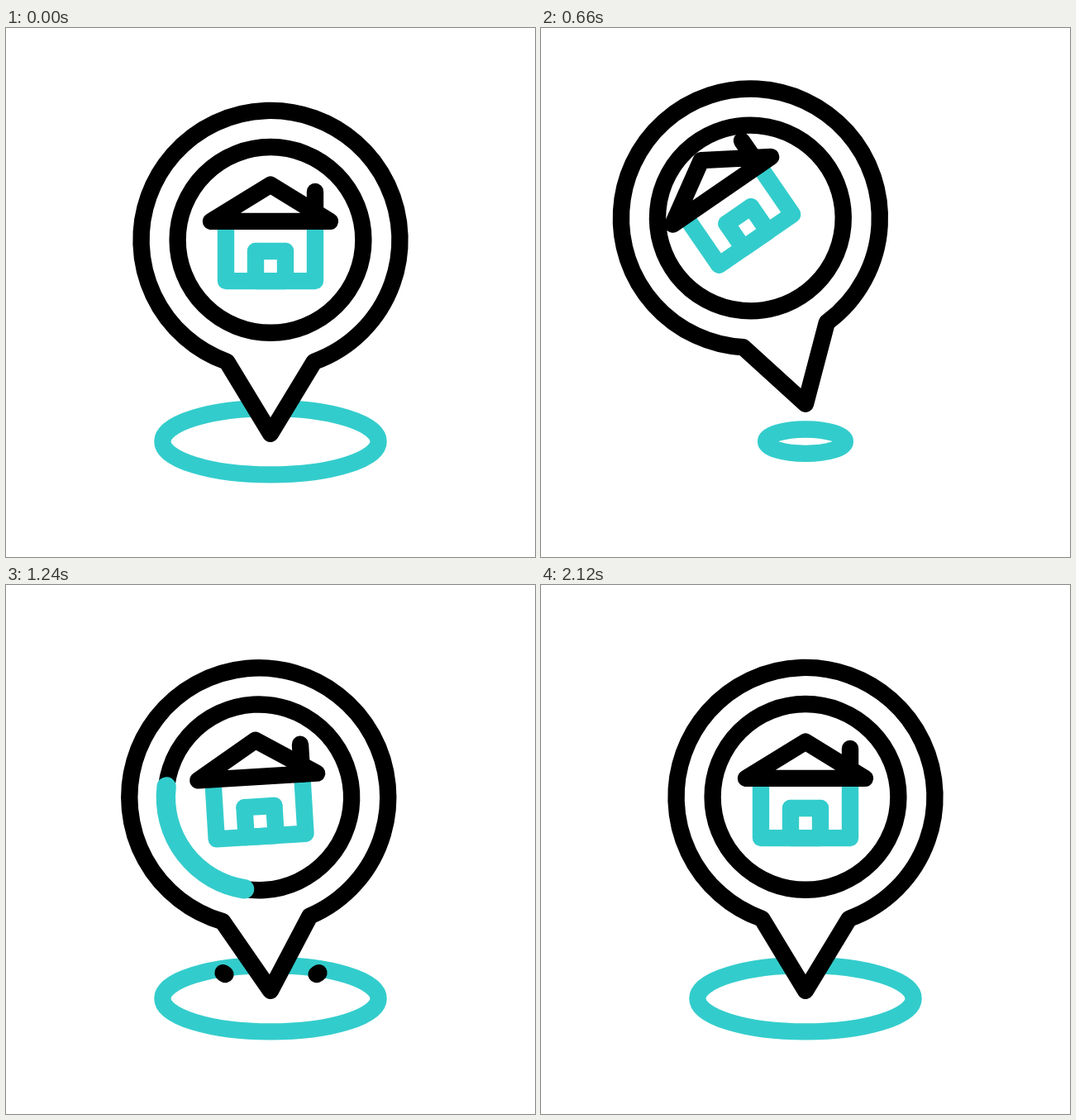
An HTML page with a canvas for the animation above (3.6 s loop, 640x640 px).

```html
<!DOCTYPE html>
<html lang="en">
<head>
<meta charset="utf-8">
<title>Home pin</title>
<style>
  html, body { margin: 0; width: 100%; height: 100%; overflow: hidden; background: #fff; }
  canvas { display: block; width: 100vw; height: 100vh; }
</style>
</head>
<body>
<canvas id="stage" width="640" height="640"></canvas>
<script>
const ctx = document.getElementById('stage').getContext('2d');
const LOOP = 3600;
const BLACK = '#000', CYAN = '#33cccc';
const LINE = 20.4;
const MID = 320, TIP = 490.8;
const OUTER = 156.5, INNER = 112.4;
const HEAD = 234.4;       // from the tip up to the head centre
const HOUSE_PIVOT = 54;   // below the head centre

const WINDUP = 840, SWING = 1067, BEAT = 167;

const rad = deg => deg * Math.PI / 180;
const smooth = x => x * x * (3 - 2 * x);

// Eased 0 to 1 between two times; `power` above 1 delays the rise.
function ramp(t, from, to, power = 1) {
  const x = Math.min(1, Math.max(0, (t - from) / (to - from)));
  return smooth(x ** power);
}

// Rises from a to peak, then falls back until b.
const hump = (t, a, peak, b) => ramp(t, a, peak) - ramp(t, peak, b);

// Leans back, then swings past upright and settles.
const pinTilt = t =>
  -18.7 * hump(t, 0, WINDUP, SWING)
  + 4 * hump(t, WINDUP, SWING, SWING + BEAT)
  - 3.5 * hump(t, SWING, SWING + BEAT, SWING + 2 * BEAT)
  + 0.5 * hump(t, SWING + BEAT, SWING + 2 * BEAT, SWING + 3 * BEAT);

const pinLift = t => 39 * (ramp(t, 0, 720, 2.15) - ramp(t, WINDUP, 1000));

const groundScale = t =>
  1 - 0.68 * (ramp(t, 85, 770) - ramp(t, WINDUP, 1050))
  + 0.136 * hump(t, WINDUP, 1050, 1145);

const houseTilt = t => -18 * (ramp(t, 0, 615) - ramp(t, 900, 1233));

function houseLift(t) {
  const windup = ramp(t, 0, 615) - ramp(t, 890, 1200);
  const left = 1 - Math.min(1, Math.max(0, (t - 1400) / 720));
  const hop = ramp(t, 1200, 1400) * smooth(left ** 2.4);
  return 23 * windup + 21.7 * hop;
}

function stroke(color, width = LINE) {
  ctx.strokeStyle = color;
  ctx.lineWidth = width;
  ctx.stroke();
}

function line(color, ...points) {
  ctx.beginPath();
  points.forEach(([x, y]) => ctx.lineTo(x, y));
  stroke(color);
}

function ring(radius, from, to, color, width) {
  ctx.beginPath();
  ctx.arc(0, 0, radius, rad(from), rad(to));
  stroke(color, width);
}

function drawGround(t) {
  const s = groundScale(t);
  ctx.beginPath();
  ctx.ellipse(MID, 500.2, 130.6 * s, 40.2 * s, 0, 0, 2 * Math.PI);
  stroke(CYAN);
}

function drawSparks(t) {
  if (t <= 930 || t >= 1420) return;
  const near = 20 + 38 * ramp(t, 1000, 1290);
  const far = 20.01 + 38 * ramp(t, 930, 1220);
  const y = d => 505.8 - 0.63 * d;
  for (const side of [-1, 1]) {
    line(BLACK, ...[near, far].map(d => [MID + 0.5 + side * d, y(d)]));
  }
}

function drawPin() {
  const gap = rad(19.7);
  ctx.beginPath();
  ctx.arc(0, 0, OUTER, Math.PI / 2 + gap, Math.PI / 2 - gap);
  ctx.lineTo(0, HEAD);
  ctx.closePath();
  ctx.fillStyle = '#fff';
  ctx.fill();
  stroke(BLACK);
  ring(INNER, 0, 360, BLACK);
}

function drawGlint(t) {
  if (t <= 667 || t >= 1700) return;
  const top = -87.2;
  const tail = top + 360 * ramp(t, 843, 1612);
  const front = top + 360 * ramp(t, 667, 1520, 0.94) + 0.01;
  ring(INNER, tail, front, CYAN, 23.4);
}

function drawHouse(t) {
  const eaves = -22.5, floor = 49.7, wall = 54, door = 18;
  ctx.save();
  ctx.translate(0, HOUSE_PIVOT - houseLift(t));
  ctx.rotate(rad(houseTilt(t)));
  ctx.translate(0, -HOUSE_PIVOT);
  const box = (half, top) =>
    line(CYAN, [-half, top], [-half, floor], [half, floor], [half, top]);
  box(wall, eaves);
  box(door, 13.6);
  line(CYAN, [-door, 13.6], [door, 13.6]);
  line(BLACK, [-72, eaves], [0, -66.8], [72, eaves], [-72, eaves]);
  line(BLACK, [wall, -58.5], [wall, eaves]);
  ctx.restore();
}

function draw(t) {
  ctx.fillStyle = '#fff';
  ctx.fillRect(0, 0, 640, 640);
  ctx.lineCap = ctx.lineJoin = 'round';
  drawGround(t);
  drawSparks(t);
  ctx.save();
  ctx.translate(MID, TIP - pinLift(t));
  ctx.rotate(rad(pinTilt(t)));
  ctx.translate(0, -HEAD);
  drawPin();
  drawGlint(t);
  drawHouse(t);
  ctx.restore();
}

const begin = performance.now();
function tick() {
  draw((performance.now() - begin) % LOOP);
  requestAnimationFrame(tick);
}
tick();
</script>
</body>
</html>
```
